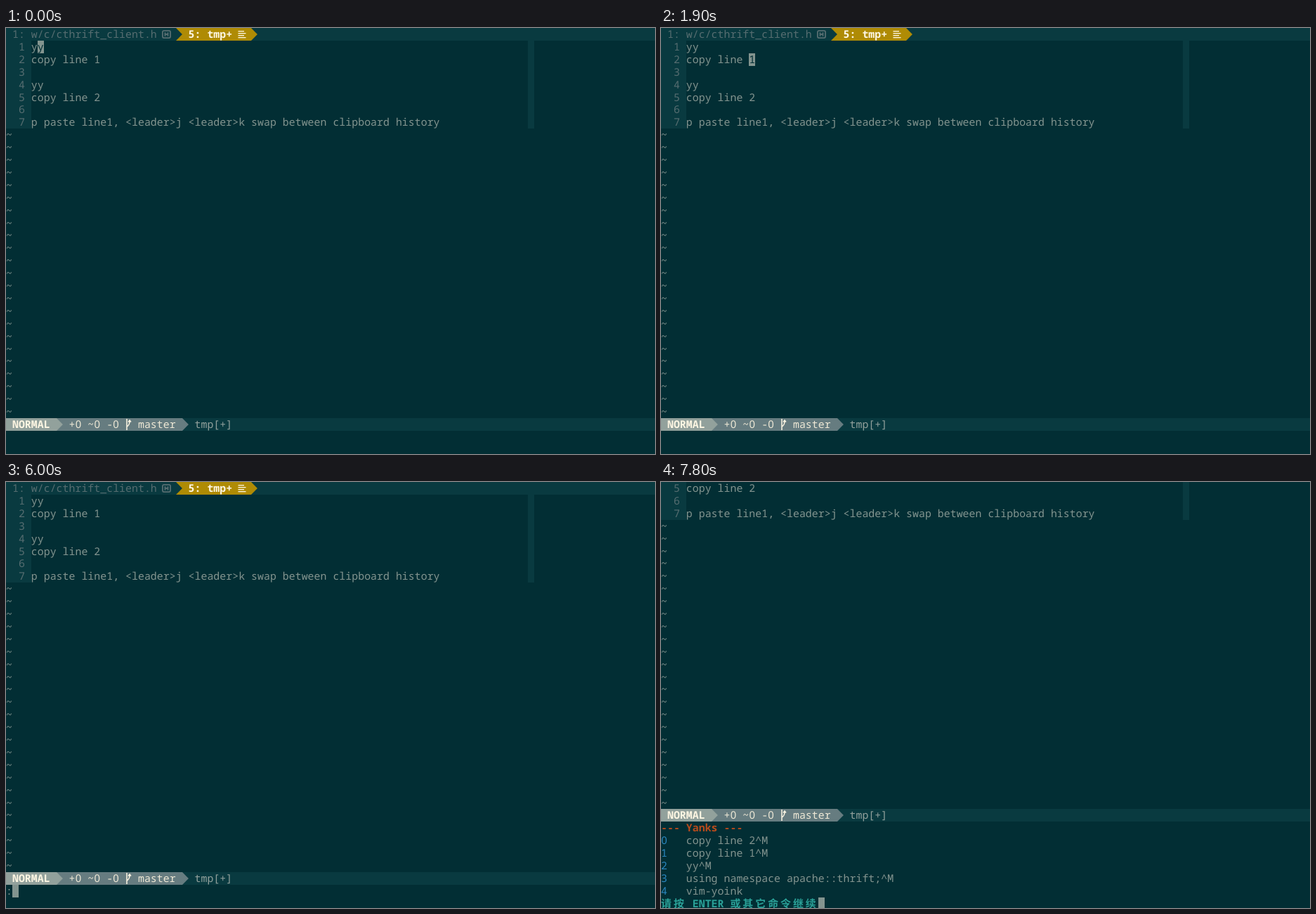
Write an HTML page with a canvas that moves like this. It is 924 by 606 pixels and loops after 8 s.

```html
<!DOCTYPE html>
<html lang="en">
<head>
<meta charset="utf-8">
<title>Terminal editor</title>
<style>
html, body { margin: 0; width: 100%; height: 100%; overflow: hidden; background: #022e34; }
canvas { display: block; }
</style>
</head>
<body>
<canvas id="stage" width="924" height="606"></canvas>
<script>
const ctx = document.getElementById('stage').getContext('2d');
const LOOP = 8000, CW = 8.95, RH = 17.9, SIZE = 14.92;
const MONO = '"Noto Sans Mono", "DejaVu Sans Mono", monospace';
const SANS = '"Noto Sans", "Open Sans", sans-serif';
const CJK = '"Noto Sans CJK SC", "Noto Sans CJK", sans-serif';

const C = {
  bg: '#022e34', band: '#093a40', text: '#83948f', dim: '#566d70',
  mode: '#92a19c', git: '#667c80', pale: '#eee8d5', cream: '#fdf6e3',
  tab: '#af8b05', orange: '#b84b1c', blue: '#2b87c0', cyan: '#2aa198'
};

const LINES = [
  'yy', 'copy line 1', '', 'yy', 'copy line 2', '',
  'p paste line1, <leader>j <leader>k swap between clipboard history'
];
const YANKS = ['copy line 2^M', 'copy line 1^M', 'yy^M', 'using namespace apache::thrift;^M', 'vim-yoink'];

// Each step: start time, cursor row, cursor column, command line
const STEPS = [
  [0, 1, 5, ''],
  [500, 2, 14, ''],
  [1500, 3, 4, ''],
  [1900, 2, 14, ''],
  [3800, 4, 5, ''],
  [4100, 5, 14, ''],
  [6000, 32, 1, ':'],
  [6600, 32, 3, ':Ya'],
  [6900, 32, 4, ':Yan'],
  [7100, 32, 6, ':Yanks'],
  [7800, 33, 25, '', true]
];

function fill(col, row, cols, rows, color) {
  const x = Math.round(col * CW), y = Math.round(row * RH);
  ctx.fillStyle = color;
  ctx.fillRect(x, y, Math.round((col + cols) * CW) - x, Math.round((row + rows) * RH) - y);
}

function write(str, col, row, color, weight = 400) {
  ctx.fillStyle = color;
  const y = row * RH + 14;
  for (const ch of str) {
    const wide = ch > '\u2fff';
    // The terminal face has an open zero
    const face = wide ? CJK : ch === '0' ? SANS : MONO;
    ctx.font = `${weight} ${SIZE}px ${face}`;
    ctx.textAlign = wide ? 'left' : 'center';
    ctx.fillText(ch, (wide ? col : col + 0.5) * CW, y);
    col += wide ? 2 : 1;
  }
}

function arrow(col, row, color) {
  const x = Math.round(col * CW), y = Math.round(row * RH), h = Math.round((row + 1) * RH) - y;
  ctx.fillStyle = color;
  ctx.beginPath();
  ctx.moveTo(x, y);
  ctx.lineTo(x + CW, y + h / 2);
  ctx.lineTo(x, y + h);
  ctx.fill();
}

function tabs() {
  fill(0, 0, 104, 1, C.band);
  write('1: w/c/cthrift_client.h', 1, 0, C.dim);
  ctx.strokeStyle = C.dim;
  ctx.lineWidth = 1.8;
  ctx.beginPath();
  ctx.roundRect(222.9, 3.9, 11.2, 10.2, 2);
  ctx.moveTo(226.5, 6.3);
  ctx.lineTo(226.5, 11.7);
  ctx.moveTo(230.5, 6.3);
  ctx.lineTo(230.5, 11.7);
  ctx.moveTo(226.5, 9);
  ctx.lineTo(230.5, 9);
  ctx.stroke();

  fill(27, 0, 12, 1, C.tab);
  arrow(27, 0, C.band);
  arrow(39, 0, C.tab);
  write('5: tmp+', 29, 0, C.cream, 700);
  ctx.fillStyle = C.cream;
  for (let i = 0; i < 4; i++) ctx.fillRect(330.5, 4 + i * 3, i % 2 ? 11 : 8.5, 1.3);
}

function buffer(top) {
  fill(0, 1 - top, 4, 7, C.band);
  fill(83, 1 - top, 1, 7, C.band);
  LINES.forEach((line, i) => {
    const row = i + 1 - top;
    if (row < 0) return;
    write(String(i + 1), 2, row, C.dim);
    write(line, 4, row, C.text);
  });
  for (let row = 8; row < 31; row++) write('~', 0, row - top, C.text);
}

function status(row) {
  fill(0, row, 104, 1, C.band);
  fill(8, row, 20, 1, C.git);
  fill(0, row, 8, 1, C.mode);
  arrow(8, row, C.mode);
  arrow(28, row, C.git);
  write('NORMAL', 1, row, C.cream, 700);
  write('+0 ~0 -0', 10, row, C.pale);
  write('master', 21, row, C.pale);
  write('tmp[+]', 30, row, C.mode);
  const y = Math.round(row * RH);
  ctx.strokeStyle = C.cream;
  ctx.lineWidth = 1.5;
  ctx.beginPath();
  ctx.moveTo(172, y + 1);
  ctx.lineTo(172, y + 17);
  ctx.moveTo(172, y + 12);
  ctx.quadraticCurveTo(176, y + 10, 176, y + 4);
  ctx.moveTo(174, y + 5.5);
  ctx.lineTo(176, y + 3);
  ctx.lineTo(178, y + 5.5);
  ctx.stroke();
}

function yankList() {
  write('--- Yanks ---', 0, 27, C.orange, 700);
  YANKS.forEach((yank, i) => {
    write(String(i), 0, 28 + i, C.blue);
    write(yank, 4, 28 + i, C.text);
  });
  write('请按 ENTER 或其它命令继续', 0, 33, C.cyan, 700);
}

function draw(t) {
  const [, row, col, cmd, listing] = STEPS.findLast(s => s[0] <= t);
  const top = listing ? 5 : 0;
  ctx.fillStyle = C.bg;
  ctx.fillRect(0, 0, 924, 606);
  buffer(top);
  if (!listing) tabs();
  status(31 - top);
  if (listing) yankList();
  write(cmd, 0, 32, C.text);

  fill(col, row, 1, 1, C.text);
  const under = row < 8 ? LINES[row - 1][col - 4] : '';
  if (under) write(under, col, row, C.bg);
}

ctx.textRendering = 'geometricPrecision';
const start = performance.now();
function tick() {
  draw((performance.now() - start) % LOOP);
  requestAnimationFrame(tick);
}
tick();
</script>
</body>
</html>
```
